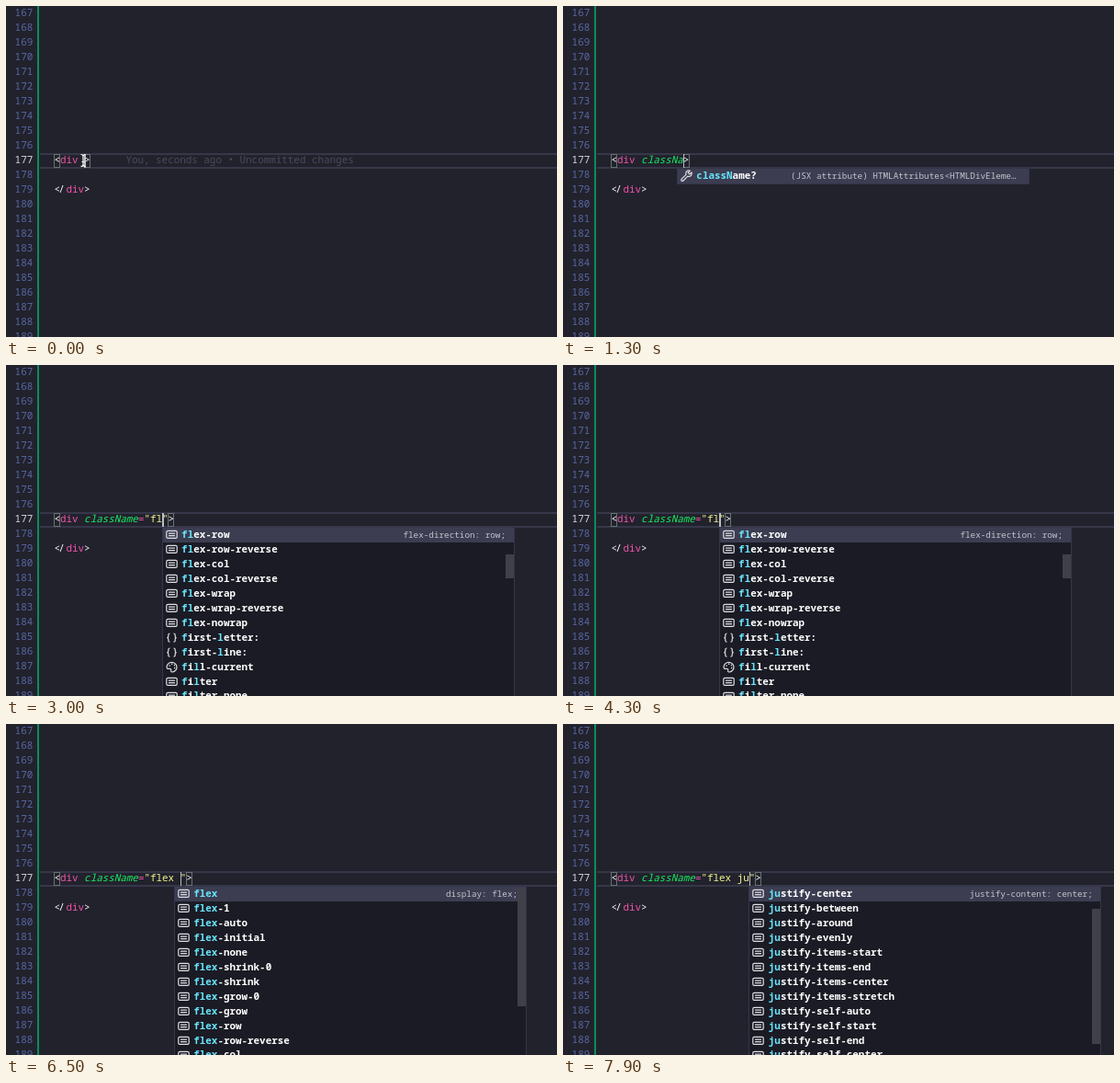
Animation of 600x360 px, one loop 8000 ms. Source, as an HTML page:

```html
<!DOCTYPE html>
<html lang="en">
<head>
<meta charset="utf-8">
<title>Class completion</title>
<style>
  html, body { margin: 0; width: 100%; height: 100%; overflow: hidden; background: #22222d; }
  #stage {
    position: relative; width: 600px; height: 360px; overflow: hidden; background: #22222d;
    font: 500 10.9px/16px "Noto Sans Mono", "DejaVu Sans Mono", monospace;
    font-variant-ligatures: none; color: #fff;
  }
  #stage div, #stage svg { position: absolute; white-space: pre; }
  #bar { left: 34px; top: 0; width: 2px; height: 360px; background: #0c8c5c; }
  #line { left: 37px; right: 0; top: 160px; height: 13px; border: solid #363748; border-width: 2px 0; }
  .num { left: 9.6px; color: #5868a3; font-weight: 400; }
  .num.on { color: #d8d8df; }
  .code { left: 52.4px; }
  .tag { color: #f254a9; }
  .attr { color: #16ee60; font-style: italic; }
  .str { color: #f0f88c; }
  .slash { margin: 0 1.8px 0 -1.8px; }
  #note { left: 130.4px; color: #4a4b5a; font-weight: 400; }
  .match { top: 161px; width: 5px; height: 13px; border: 1px solid #66736f; }
  #caret { top: 160.5px; width: 1.8px; height: 15.5px; background: #bcbcc2; }
  #popup { top: 176px; width: 382px; background: #1b1b25; border: 1px solid #34364a; overflow: hidden; }
  .row { left: 0; width: 382px; height: 16px; font-weight: 600; }
  .row.sel { background: #3c3d51; }
  .row svg { left: 3px; top: 1.3px; fill: none; stroke: #dedee3; stroke-width: 1.2; }
  .name { left: 20.5px; top: -.8px; }
  .name b { color: #68e4fb; font-weight: 700; }
  .info { right: 8.6px; top: -.2px; font-size: 9.3px; font-weight: 400; color: #c4c4cd; }
  #thumb { right: 0; width: 9px; background: #3f404a; }
</style>
</head>
<body>
<div id="stage">
  <div id="line"></div>
  <div id="bar"></div>
  <div id="nums"></div>
  <div id="open" class="match" style="left:52.3px"></div>
  <div id="close" class="match"></div>
  <div id="code" class="code" style="top:159.3px"></div>
  <div class="code" style="top:191.3px">&lt;<span class="slash">/</span><span class="tag">div</span>&gt;</div>
  <svg id="wave" width="100" height="5" style="left:85px;top:172.5px" fill="none" stroke="#e0383c"></svg>
  <div id="note" style="top:159.3px">You, seconds ago • Uncommitted changes</div>
  <div id="popup"></div>
  <div id="caret"></div>
  <svg id="mouse" width="8" height="16" style="left:80px;top:160px" fill="none">
    <path d="M1.5 1.5q2.5 0 2.5 2v9q0 2-2.5 2M6.5 1.5q-2.5 0-2.5 2M4 12.5q0 2 2.5 2M2.5 9.5h3" stroke="#fff" stroke-width="1.2"/>
  </svg>
</div>
<script>
const $ = id => document.getElementById(id);
const LOOP = 8000, CHAR = 6.54, LEFT = 52.4, LAG = 100;

const icons = {
  value: '<rect x=".8" y="2.4" width="11.4" height="8" rx="1.4"/><path d="M3 5.2h7M3 7.6h7"/>',
  snippet: '<path d="M1.5 11.5v-10h10.5v10"/><path d="M1.5 11.8h11" stroke-dasharray="1.5 1.5"/>',
  wrench: '<path d="M1.2 10.2L6 5.4Q5.3 2.5 7.5 1.3 9 .6 10.2 1.2L8.2 3.3 9.9 5 12 3Q12.6 5 11.4 6.4 10 8 7.8 7.2L3 12Q2 12.8 1.2 12 .4 11.1 1.2 10.2Z"/>',
  braces: '<path d="M4.5 2Q2.8 2 2.8 3.5V5.2Q2.8 6.6 1.3 6.6 2.8 6.6 2.8 8V9.7Q2.8 11.2 4.5 11.2M8.5 2Q10.2 2 10.2 3.5V5.2Q10.2 6.6 11.7 6.6 10.2 6.6 10.2 8V9.7Q10.2 11.2 8.5 11.2"/>',
  palette: '<path d="M1 6.5A5.5 5.3 0 1 1 7 12Q5.3 12 5.7 10 6 8 4 8.3 1 9 1 6.5Z"/><path d="M3.5 5h1.2M6 3.2h1.2M8.8 4.5h1.2M9 7.5h1.2" stroke-width="1.5"/>'
};

const words = s => s.split(' ');
const lists = {
  attr: { rows: ['class', 'className?'], info: 'Class Definition' },
  prop: { rows: ['className?'], info: '(JSX attribute) HTMLAttributes<HTMLDivEleme…', pad: 13.3 },
  row: {
    rows: words('flex-row flex-row-reverse flex-col flex-col-reverse flex-wrap flex-wrap-reverse flex-nowrap first-letter: first-line: fill-current filter filter-none'),
    info: 'flex-direction: row;', thumb: [29, 26]
  },
  flex: {
    rows: words('flex flex-1 flex-auto flex-initial flex-none flex-shrink-0 flex-shrink flex-grow-0 flex-grow flex-row flex-row-reverse flex-col'),
    info: 'display: flex;', thumb: [1, 129]
  },
  justify: {
    rows: words('justify-center justify-between justify-around justify-evenly justify-items-start justify-items-end justify-items-center justify-items-stretch justify-self-auto justify-self-start justify-self-end justify-self-center'),
    info: 'justify-content: center;', thumb: [24, 147]
  }
};

// [time, attribute name, string, list, query]; string null means no quotes yet
const keys = [
  [0, '', null],
  [260, 'c', null, 'attr', 'c'],
  [360, 'cl', null, 'attr', 'cl'],
  [460, 'cla', null, 'attr', 'cla'],
  [560, 'clas', null, 'attr', 'clas'],
  [660, 'class', null, 'attr', 'class'],
  [1160, 'classN', null, 'prop', 'classN'],
  [1260, 'classNa', null, 'prop', 'classNa'],
  [1460, 'classNam', null, 'prop', 'classNam'],
  [1560, 'className', null, 'prop', 'className'],
  [1760, 'className=', null, 'prop', ''],
  [1960, 'className=', '', 'row', ''],
  [2760, 'className=', 'f', 'row', 'f'],
  [2860, 'className=', 'fl', 'row', 'fl'],
  [5960, 'className=', 'fle', 'flex', 'fle'],
  [6160, 'className=', 'flex', 'flex', 'flex'],
  [6460, 'className=', 'flex ', 'justify', ''],
  [7560, 'className=', 'flex j', 'justify', 'j'],
  [7760, 'className=', 'flex ju', 'justify', 'ju']
];

const esc = s => s.replace(/&/g, '&amp;').replace(/</g, '&lt;');
const span = (cls, s) => `<span class="${cls}">${esc(s)}</span>`;
const show = (id, on) => { $(id).style.visibility = on ? 'visible' : 'hidden'; };
const keyAt = t => keys.filter(k => k[0] <= t).pop() || keys[0];
const caretX = ([, attr, str]) => LEFT + CHAR * (5 + attr.length + (str === null ? 0 : 1 + str.length));

function iconFor(name) {
  if (name === 'class') return icons.snippet;
  if (name.endsWith('?')) return icons.wrench;
  if (name.endsWith(':')) return icons.braces;
  return name === 'fill-current' ? icons.palette : icons.value;
}

function mark(name, query) {
  let i = 0;
  return [...name].map(c => c === query[i] ? (i++, `<b>${c}</b>`) : c).join('');
}

function drawCode([, attr, str]) {
  const quoted = str === null ? '' : span('str', `"${str}"`);
  const eq = attr.endsWith('=') ? span('tag', '=') : '';
  $('code').innerHTML = '&lt;' + span('tag', 'div') + ' ' + span('attr', attr.replace('=', '')) + eq + quoted + '&gt;';
  const length = 5 + attr.length + (str === null ? 0 : str.length + 2);
  $('close').style.left = LEFT + CHAR * length - .3 + 'px';
}

function drawPopup(key) {
  const list = lists[key[3]];
  show('popup', list);
  if (!list) { $('popup').innerHTML = ''; return; }
  const { rows, info, thumb, pad = 8.6 } = list;
  $('popup').style.left = caretX(key) - .5 + 'px';
  $('popup').style.height = rows.length * 16 + (rows.length === 2 ? 2 : 0) + 'px';
  $('popup').innerHTML = rows.map((name, i) =>
    `<div class="row${i ? '' : ' sel'}" style="top:${i * 15.93}px"><svg width="14" height="14">${iconFor(name)}</svg>` +
    `<div class="name">${mark(name, key[4])}</div>` +
    (i ? '' : `<div class="info" style="right:${pad}px">${esc(info)}</div>`) + '</div>').join('') +
    (thumb ? `<div id="thumb" style="top:${thumb[0]}px;height:${thumb[1]}px"></div>` : '');
}

for (let n = 167; n < 190; n++) {
  $('nums').insertAdjacentHTML('beforeend',
    `<div class="num${n === 177 ? ' on' : ''}" style="top:${(n - 167) * 15.98 - .6}px">${n}</div>`);
}

const zigzag = (x, n) => `M${x} 3` + 'l1.6-2l1.6 2'.repeat(n);
$('wave').innerHTML = `<path d="${zigzag(1, 10)}${zigzag(47, 2)}"/>`;

let lastCode, lastPopup;
function render(t) {
  const key = keyAt(t), late = keyAt(t - LAG);
  if (key !== lastCode) drawCode(lastCode = key);
  if (late !== lastPopup) drawPopup(lastPopup = late);
  const idle = key === keys[0], broken = t >= 1860 && t < 2160;
  show('note', idle);
  show('mouse', idle);
  show('wave', broken);
  show('open', !broken);
  show('close', !broken);
  show('caret', (t - key[0]) % 1000 < 500);
  $('caret').style.left = caretX(key) - .2 + 'px';
}

const start = performance.now();
function tick() {
  render((performance.now() - start) % LOOP);
  requestAnimationFrame(tick);
}
tick();
</script>
</body>
</html>
```
